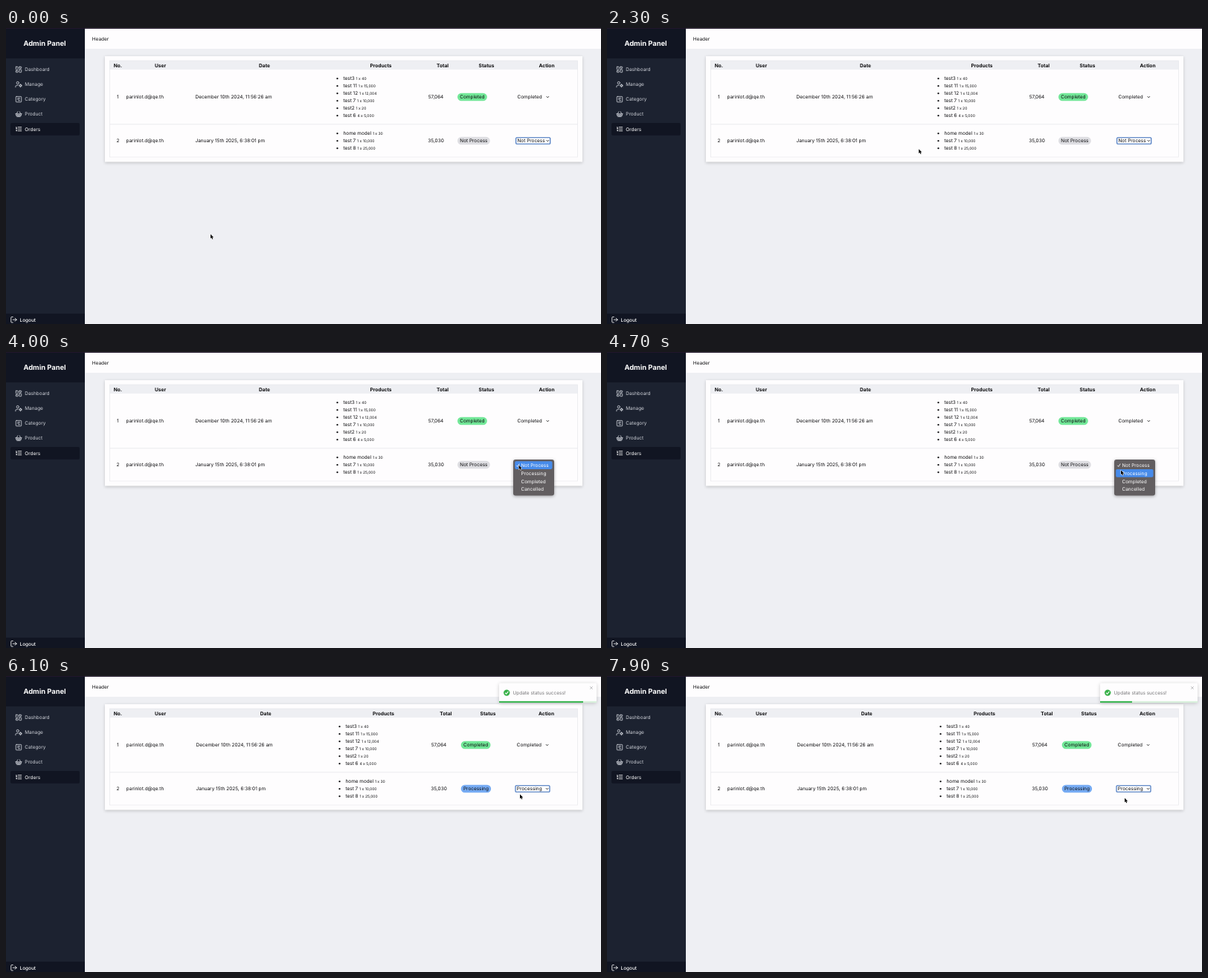
An HTML page with a canvas for the animation above (8000 ms loop, 800 px wide and 399 px high).

```html
<!DOCTYPE html>
<html lang="en">
<head>
<meta charset="utf-8">
<title>Admin Panel</title>
<style>
  html, body { margin: 0; width: 100%; height: 100%; overflow: hidden; background: #eeeff3; }
  canvas { display: block; width: 800px; height: 399px; }
</style>
</head>
<body>
<canvas id="stage"></canvas>
<script>
const W = 800, H = 399, LOOP = 8000, STEP = 100;
const BODY = 6.45, SMALL = 5, BOLD = 6.62;
const canvas = document.getElementById('stage');
const ctx = canvas.getContext('2d');
const ratio = window.devicePixelRatio || 1;
canvas.width = Math.round(W * ratio);
canvas.height = Math.round(H * ratio);

const MENU_ITEMS = ['Not Process', 'Processing', 'Completed', 'Cancelled'];
const PILL_COLORS = { 'Not Process': '#dedee2', Processing: '#76abf3', Completed: '#72e798' };

const ICONS = {
  dashboard: 'M4 3h5a1 1 0 0 1 1 1v7a1 1 0 0 1-1 1H4a1 1 0 0 1-1-1V4a1 1 0 0 1 1-1zM15 3h5a1 1 0 0 1 1 1v3a1 1 0 0 1-1 1h-5a1 1 0 0 1-1-1V4a1 1 0 0 1 1-1zM15 12h5a1 1 0 0 1 1 1v7a1 1 0 0 1-1 1h-5a1 1 0 0 1-1-1v-7a1 1 0 0 1 1-1zM4 16h5a1 1 0 0 1 1 1v3a1 1 0 0 1-1 1H4a1 1 0 0 1-1-1v-3a1 1 0 0 1 1-1z',
  manage: 'M10 15H6a4 4 0 0 0-4 4v2M13 7a4 4 0 1 1-8 0a4 4 0 1 1 8 0M21 16a3 3 0 1 1-6 0a3 3 0 1 1 6 0M18 11v2M18 19v2M13.5 16h1.5M21 16h1.5M15 13l1 1M20 18l1 1M21 13l-1 1M16 18l-1 1',
  category: 'M5 3h14a2 2 0 0 1 2 2v14a2 2 0 0 1-2 2H5a2 2 0 0 1-2-2V5a2 2 0 0 1 2-2zM9 8h7M8 12h6M11 16h5',
  product: 'M15 11l-1 9M19 11l-4-7M2 11h20M3.5 11l1.6 7.4a2 2 0 0 0 2 1.6h9.8a2 2 0 0 0 2-1.6l1.7-7.4M4.5 15.5h15M5 11l4-7M9 11l1 9',
  orders: 'M10 12h11M10 18h11M10 6h11M4 10h2M4 6h1v4M6 18H4c0-1 2-2 2-3s-1-1.5-2-1',
  logout: 'M9 21H5a2 2 0 0 1-2-2V5a2 2 0 0 1 2-2h4M16 17l5-5-5-5M21 12H9'
};

const NAV = [['dashboard', 'Dashboard'], ['manage', 'Manage'], ['category', 'Category'],
  ['product', 'Product'], ['orders', 'Orders']];

const ORDERS = [
  { y: 93, top: 68, date: 'December 10th 2024, 11:56:26 am', total: '57,064',
    products: [['test3', '1 x 40'], ['test 11', '1 x 15,000'], ['test 12', '1 x 12,004'],
      ['test 7', '1 x 10,000'], ['test2', '1 x 20'], ['test 6', '4 x 5,000']] },
  { y: 152, top: 142, date: 'January 15th 2025, 6:38:01 pm', total: '35,030',
    products: [['home model', '1 x 30'], ['test 7', '1 x 10,000'], ['test 8', '1 x 25,000']] }
];

// Column positions before and after the status update reflows the table.
const LAYOUT_BEFORE = { heads: [150.3, 207.5, 347.5, 504, 587, 646, 727],
  user: 161.5, date: 254.5, bullet: 445.5, total: 578, pill: 607, action: 687.5 };
const LAYOUT_AFTER = { heads: [150.3, 207.5, 349.3, 507.5, 591.3, 648, 726.5],
  user: 161.8, date: 255.6, bullet: 448.5, total: 582, pill: 611.7, action: 686.8 };
const HEADS = ['No.', 'User', 'Date', 'Products', 'Total', 'Status', 'Action'];

// Pointer: time, x, y
const POINTER = [
  [0, 275, 278], [700, 211, 255], [800, 211, 255], [900, 179, 225], [1000, 179, 225],
  [1100, 162, 203], [1300, 178, 181], [1500, 205, 172], [1700, 288, 172], [1900, 288, 172],
  [2400, 452, 161], [2500, 452, 161], [2800, 548, 157], [3000, 608, 154], [3100, 618, 153.5],
  [3400, 663, 152], [3700, 689, 152], [4300, 690, 153], [4600, 691, 159.5], [6300, 691, 159.5],
  [6500, 692, 154], [6700, 693, 156], [6900, 696, 164.5]
];
const BOUNCE = [[0, 1240], [0.6, -10], [0.75, 4], [0.9, -2], [1, 0]];

const UPDATE_AT = 5500;
const MENUS = [
  { open: 4000, close: 4900, x: 682, y: 145, checked: 0, picked: 1, hoverAt: 4500 },
  { open: 6600, close: 7300, x: 681, y: 134, checked: 1, picked: 2, hoverAt: 6900 }
];

const clamp = (v, lo, hi) => Math.min(hi, Math.max(lo, v));

function sample(keys, t, column = 1) {
  const i = keys.findIndex(k => k[0] > t);
  if (i === 0) return keys[0][column];
  if (i < 0) return keys[keys.length - 1][column];
  const a = keys[i - 1], b = keys[i];
  return a[column] + (b[column] - a[column]) * (t - a[0]) / (b[0] - a[0]);
}

function setFont(size, weight = 400) {
  ctx.font = `${weight} ${size}px Inter, "Liberation Sans", sans-serif`;
}

// y is the middle of the capitals at the body size
function text(str, x, y, { size = BODY, weight = 400, color = '#0c0c0e', align = 'left' } = {}) {
  setFont(size, weight);
  ctx.textAlign = align;
  ctx.fillStyle = color;
  ctx.fillText(str, x, y + Math.max(size, BODY) * 0.364);
}

function widthOf(str) {
  setFont(BODY);
  return ctx.measureText(str).width;
}

function rect(x, y, w, h, color) {
  ctx.fillStyle = color;
  ctx.fillRect(x, y, w, h);
}

function rounded(x, y, w, h, r, color) {
  ctx.beginPath();
  ctx.roundRect(x, y, w, h, r);
  ctx.fillStyle = color;
  ctx.fill();
}

function dot(x, y, r, color) {
  ctx.beginPath();
  ctx.arc(x, y, r, 0, Math.PI * 2);
  ctx.fillStyle = color;
  ctx.fill();
}

function line(points, color, width) {
  ctx.beginPath();
  points.forEach(([x, y]) => ctx.lineTo(x, y));
  ctx.strokeStyle = color;
  ctx.lineWidth = width;
  ctx.stroke();
}

function withShadow(color, blur, dy, draw) {
  ctx.save();
  ctx.shadowColor = color;
  ctx.shadowBlur = blur * ratio;
  ctx.shadowOffsetY = dy * ratio;
  draw();
  ctx.restore();
}

function icon(name, cx, cy, color) {
  ctx.save();
  ctx.translate(cx, cy);
  ctx.scale(0.414, 0.414);
  ctx.translate(-12, -12);
  ctx.strokeStyle = color;
  ctx.lineWidth = 2;
  ctx.lineCap = ctx.lineJoin = 'round';
  ctx.stroke(new Path2D(ICONS[name]));
  ctx.restore();
}

function drawSidebar() {
  rect(0, 0, 106, H, '#1c2230');
  rect(0, 0, 106, 41, '#111522');
  rect(0, 385, 106, 14, '#111522');
  text('Admin Panel', 52, 21, { size: 9.4, weight: 700, color: '#fff', align: 'center' });
  rounded(6, 128, 93, 16.7, 1.7, '#111522');
  NAV.forEach(([name, label], i) => {
    const y = 56 + i * 20.05;
    const color = i === 4 ? '#fff' : '#ced1d8';
    icon(name, 17, y, color);
    text(label, 25.3, y, { color });
  });
  icon('logout', 10.5, 393.2, '#fff');
  text('Logout', 18.5, 393.2, { color: '#fff', weight: 500 });
}

function drawPill(label, x, y) {
  rounded(x, y - 5.2, widthOf(label) + 6.6, 10.4, 5.2, PILL_COLORS[label]);
  text(label, x + 3.3, y);
}

function drawSelect(label, x, y, focused) {
  if (focused) {
    ctx.beginPath();
    ctx.roundRect(x - 1.8, y - 4.2, 46, 8.4, 1);
    ctx.fillStyle = '#fff';
    ctx.fill();
    ctx.strokeStyle = '#3468b8';
    ctx.lineWidth = 1.1;
    ctx.stroke();
  }
  text(label, x, y);
  line([[x + 39.2, y - 0.8], [x + 40.8, y + 0.8], [x + 42.4, y - 0.8]], '#111', 0.9);
}

function drawTable(t) {
  const updated = t >= UPDATE_AT;
  const col = updated ? LAYOUT_AFTER : LAYOUT_BEFORE;
  withShadow('rgba(0,0,0,.18)', 4, 1.2, () => rect(133, 38, 642, 142.5, '#fefdfe'));
  rect(139.5, 44, 629, 12, '#eeeff3');
  HEADS.forEach((head, i) => text(head, col.heads[i], 50.2, { size: BOLD, weight: 700, align: 'center' }));
  ctx.strokeStyle = '#e3e4e8';
  ctx.lineWidth = 0.6;
  ctx.strokeRect(139.5, 44, 629, 130);
  line([[139.5, 129.8], [768.5, 129.8]], '#e3e4e8', 0.7);

  ORDERS.forEach((order, i) => {
    const { y } = order;
    const status = i === 0 ? 'Completed' : updated ? 'Processing' : 'Not Process';
    text(i + 1, 150.4, y, { align: 'center' });
    text('parinlot.d@qe.th', col.user, y);
    text(order.date, col.date, y);
    order.products.forEach(([name, quantity], k) => {
      const py = order.top + k * 10, px = col.bullet + 8;
      dot(col.bullet, py + 0.2, 1.15, '#0c0c0e');
      text(name, px, py);
      text(quantity, px + widthOf(name + ' '), py, { size: SMALL });
    });
    text(order.total, col.total, y, { align: 'center' });
    drawPill(status, col.pill, y);
    drawSelect(status, col.action, y, i === 1);
  });
}

function drawMenu(menu, t) {
  if (t < menu.open || t >= menu.close) return;
  const { x, y } = menu;
  withShadow('rgba(0,0,0,.35)', 4, 1, () => rounded(x, y, 55, 48.5, 3, '#625e60'));
  const hovered = t < menu.hoverAt ? menu.checked : menu.picked;
  rounded(x + 2.2, y + 2.2 + hovered * 10.85, 50.3, 10.7, 1.8, '#478bea');
  MENU_ITEMS.forEach((item, i) => {
    const cy = y + 7.5 + i * 10.85;
    text(item, x + 10.5, cy, { color: '#fff' });
    if (i === menu.checked) {
      line([[x + 4.3, cy + 0.4], [x + 5.7, cy + 2], [x + 8.2, cy - 1.8]], '#fff', 0.8);
    }
  });
}

function drawToast(t) {
  if (t < UPDATE_AT) return;
  const p = clamp((t - UPDATE_AT) / 470, 0, 1);
  const left = 131 - clamp((t - 5637) * 0.0389, 0, 131);
  ctx.save();
  ctx.globalAlpha = clamp(p / 0.6, 0, 1);
  ctx.translate(663 + sample(BOUNCE, p), 9.5);
  withShadow('rgba(0,0,0,.2)', 5, 1, () => rounded(0, 0, 131, 26.5, 1.7, '#fefdfe'));
  rect(0, 24.4, 131, 2.1, '#d9f1dc');
  rect(0, 24.4, left, 2.1, '#3db653');
  dot(10.2, 13.1, 4.2, '#38b149');
  line([[8, 13.2], [9.6, 14.8], [12.4, 11.3]], '#fff', 1.1);
  text('Update status success!', 18.5, 13, { color: '#757577' });
  line([[122.2, 4.6], [125.8, 8.2]], '#a2a2a6', 0.7);
  line([[125.8, 4.6], [122.2, 8.2]], '#a2a2a6', 0.7);
  ctx.restore();
}

function drawPointer(t) {
  const x = sample(POINTER, t, 1), y = sample(POINTER, t, 2);
  const overText = t < 3600 && y < 166 &&
    [[451, 501], [567, 589], [610, 648]].some(([a, b]) => x > a && x < b);
  ctx.save();
  ctx.translate(x, y);
  if (overText) {
    const beam = new Path2D('M-1.4-3.2Q0-3.2 0-2.2Q0-3.2 1.4-3.2M0-2.4V2.4M-1.4 3.2Q0 3.2 0 2.2Q0 3.2 1.4 3.2');
    for (const [color, width] of [['rgba(255,255,255,.7)', 1.5], ['#222', 0.7]]) {
      ctx.strokeStyle = color;
      ctx.lineWidth = width;
      ctx.stroke(beam);
    }
  } else {
    const arrow = new Path2D('M0 0V5.8L1.35 4.6L2.3 6.8L3.3 6.35L2.4 4.25H4.2Z');
    ctx.strokeStyle = '#fff';
    ctx.lineWidth = 1;
    ctx.lineJoin = 'round';
    ctx.stroke(arrow);
    ctx.fillStyle = '#000';
    ctx.fill(arrow);
  }
  ctx.restore();
}

function draw(t) {
  ctx.setTransform(ratio, 0, 0, ratio, 0, 0);
  ctx.textRendering = 'geometricPrecision';
  rect(0, 0, W, H, '#eeeff3');
  rect(106, 0, 694, 28, '#fefdfe');
  text('Header', 115.8, 14.4);
  drawSidebar();
  rect(0, 0, W, 1, '#21172b');
  drawTable(t);
  drawToast(t);
  MENUS.forEach(menu => drawMenu(menu, t));
  drawPointer(t);
}

const start = performance.now();
function tick() {
  const t = (performance.now() - start) % LOOP;
  draw(Math.floor(t / STEP) * STEP);
  requestAnimationFrame(tick);
}
tick();
</script>
</body>
</html>
```
